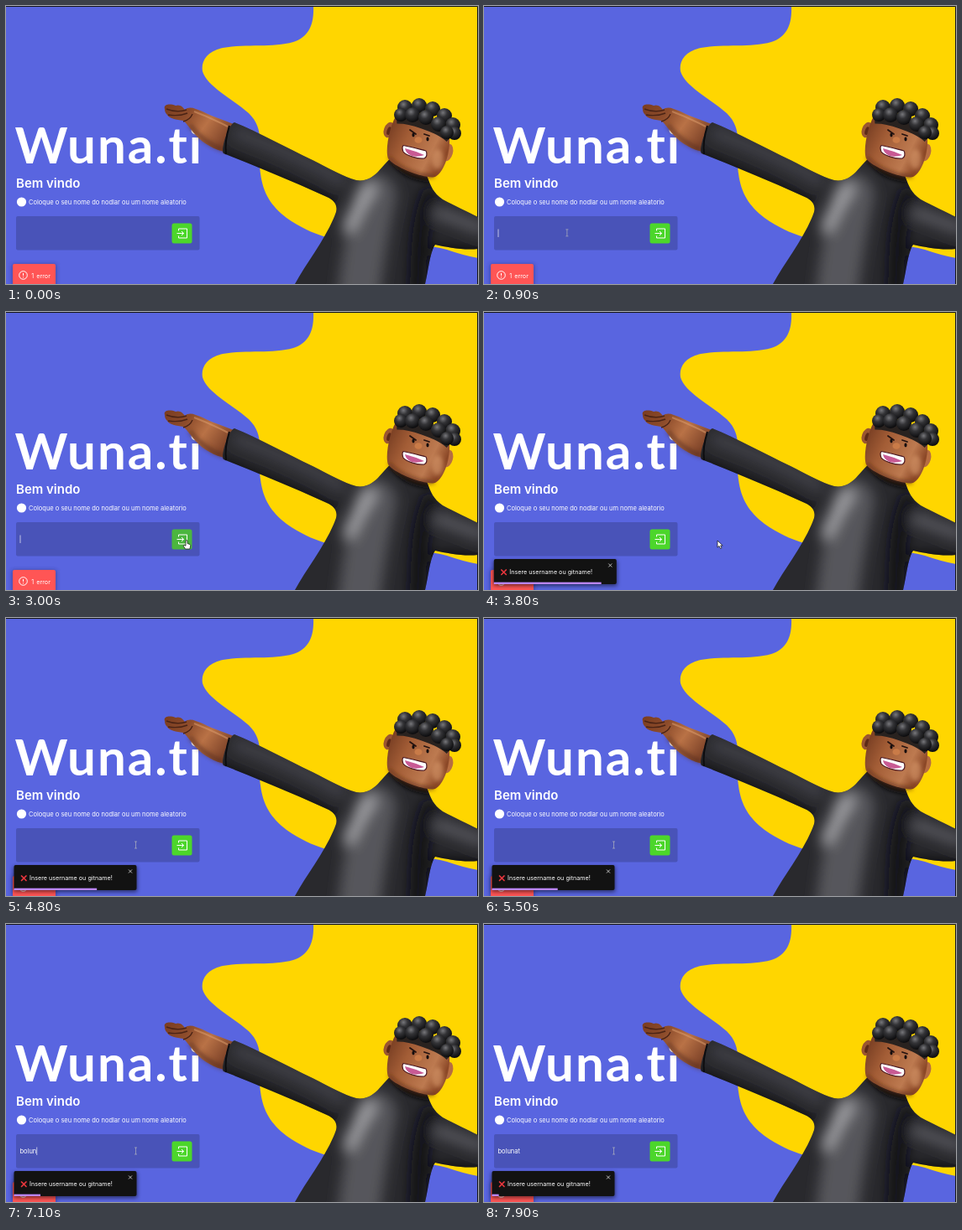
Write an HTML page that moves like this. It is 562 px wide and 332 px high and loops after 8 s.

```html
<!DOCTYPE html>
<html lang="pt">
<head>
<meta charset="utf-8">
<title>Bem vindo</title>
<style>
  html, body { margin: 0; width: 100%; height: 100%; overflow: hidden; background: #5965e0; }
  svg { display: block; width: 562px; height: 332px; }
  text { font-family: Inter, sans-serif; fill: #fff; }
</style>
</head>
<body>
<svg viewBox="0 0 562 332">
  <defs>
    <linearGradient id="palm" x1="0" y1="0" x2="1" y2=".5">
      <stop offset="0" stop-color="#7a3c20"/><stop offset=".35" stop-color="#8d4c2b"/><stop offset=".65" stop-color="#b97246"/><stop offset="1" stop-color="#80452a"/>
    </linearGradient>
    <linearGradient id="face" x1="0" y1="0" x2="1" y2=".5">
      <stop offset="0" stop-color="#6b351d"/><stop offset=".4" stop-color="#a35d36"/><stop offset=".8" stop-color="#bd7a50"/><stop offset="1" stop-color="#8b4827"/>
    </linearGradient>
    <radialGradient id="curl" cx=".4" cy=".3" r=".7">
      <stop offset="0" stop-color="#77777b"/><stop offset=".4" stop-color="#343437"/><stop offset="1" stop-color="#0b0b0d"/>
    </radialGradient>
    <filter id="soft" x="-50%" y="-50%" width="200%" height="200%"><feGaussianBlur stdDeviation="8"/></filter>
    <filter id="fine" x="-50%" y="-50%" width="200%" height="200%"><feGaussianBlur stdDeviation="2.5"/></filter>
    <path id="suit" d="M272 139C300 150 335 170 365 184C385 194 402 204 417 208C429 210 437 204 443 198C450 190 456 183 461 179L501 203C505 211 507 223 520 231C535 239 550 246 562 252V290C545 292 525 288 511 285C505 293 503 315 499 332H344C358 306 383 275 393 246C395 238 391 232 382 228C340 209 300 192 259 176C255 172 265 141 272 139Z"/>
    <clipPath id="inSuit"><use href="#suit"/></clipPath>
  </defs>

  <rect width="562" height="332" fill="#5965e0"/>
  <path fill="#ffd600" d="M366 0C367 23 360 37 342 43C318 50 287 45 258 50C239 54 232 66 234 78C239 96 270 111 289 128C300 139 303 150 302 168C301 184 302 192 303 200C306 224 316 239 334 253C348 263 364 271 381 276C430 287 490 281 525 291Q545 298 562 301V0Z"/>
  <path d="M0 .5H561.500V332" fill="none" stroke="#17171c"/>

  <text x="10.500" y="188" font-size="60" font-weight="700" letter-spacing="2" style="font-family:Lato,sans-serif">Wuna.ti</text>
  <text x="12" y="217" font-size="15" font-weight="600">Bem vindo</text>
  <circle cx="18.500" cy="234" r="5.600" fill="#fff"/>
  <text x="27" y="236.600" font-size="7.5">Coloque o seu nome do nodlar ou um nome aleatorio</text>

  <rect x="12" y="251" width="218.500" height="40.500" rx="2" fill="#4953b8"/>
  <text id="typed" x="16.500" y="274" font-size="7.5"></text>
  <rect id="caret" y="266.500" width=".8" height="9.500" fill="#fff" opacity=".8"/>
  <rect id="button" x="197.500" y="259.500" width="24" height="24" rx="2.500"/>
  <path d="M205.500 268.500V266H215.500V277H205.500V274.500M203.500 271.500H211.500M209 269L211.500 271.500L209 274" fill="none" stroke="#fff"/>

  <!-- hand -->
  <path fill="url(#palm)" d="M189 123C187 118 194 116 202 119C207 117 211 121 213 124C216 121 221 121 226 123C236 126 243 131 250 133L271 141L260 174C246 171 232 162 224 152C219 146 215 140 211 137C203 136 194 134 192 130C190 128 189 126 189 123Z"/>
  <path d="M191 123Q204 128 215 124M193 130Q206 132 216 128M211 138Q219 136 222 129" fill="none" stroke="#4a2315" stroke-width="1.400"/>
  <path d="M224 126Q243 133 264 144" fill="none" stroke="#e0a06e" stroke-width="2" opacity=".5"/>
  <path d="M219 142Q235 164 262 173" fill="none" stroke="#54291a" stroke-width="5" opacity=".6" filter="url(#fine)"/>

  <!-- body -->
  <ellipse cx="456" cy="148" rx="6" ry="9.500" fill="#9a5631" transform="rotate(20 456 148)"/>
  <ellipse cx="456.500" cy="149" rx="2.500" ry="5" fill="#5d2a17" transform="rotate(20 456 148)"/>
  <ellipse cx="526" cy="175" rx="6" ry="10.500" fill="#b66d42" transform="rotate(15 526 175)"/>
  <use href="#suit" fill="#29292d"/>
  <g clip-path="url(#inSuit)">
    <g filter="url(#soft)" fill="none" stroke-linecap="round">
      <path d="M440 225C432 260 425 300 420 345" stroke="#56565b" stroke-width="50"/>
      <path d="M275 151C315 166 360 186 400 208" stroke="#4b4c53" stroke-width="10"/>
      <path d="M255 182C310 204 350 221 388 238" stroke="#08080a" stroke-width="12"/>
      <path d="M434 218C424 232 416 246 408 264" stroke="#a2a2a6" stroke-width="14"/>
      <path d="M505 225C490 262 492 300 490 340" stroke="#111114" stroke-width="18"/>
      <path d="M515 247C533 253 550 260 566 265" stroke="#5b5c62" stroke-width="13"/>
      <path d="M510 294C530 294 550 297 570 297" stroke="#08080a" stroke-width="12"/>
    </g>
    <path d="M459 180Q474 204 505 206" stroke="#09090b" stroke-width="9" fill="none" filter="url(#fine)"/>
  </g>
  <path d="M266 143Q260 162 262 177" fill="none" stroke="#0c0c0f" stroke-width="2"/>

  <!-- head -->
  <path fill="url(#face)" d="M464 132C476 128 524 144 528 157C529 175 522 198 511 204C500 207 462 193 455 182C451 172 457 143 464 132Z"/>
  <path d="M456 181C469 195 494 205 510 203" fill="none" stroke="#612e19" stroke-width="3" filter="url(#fine)"/>
  <ellipse cx="514" cy="183" rx="7" ry="12" fill="#d99a6c" opacity=".6" filter="url(#fine)"/>
  <path d="M481 148L488 153M498 153L504 155" stroke="#251310" stroke-width="1.800" stroke-linecap="round"/>
  <ellipse cx="485" cy="154" rx="1.600" ry="2.400" fill="#160e0e"/>
  <ellipse cx="502" cy="159" rx="1.600" ry="2.400" fill="#160e0e"/>
  <ellipse cx="491" cy="160" rx="4.500" ry="3.800" fill="#c97b48"/>
  <path d="M473 166.500C482 168 492 171 500 173C502 176 501 181 498 182C489 183 476 178 473 174Q471 169 473 166.500Z" fill="#fff" stroke="#4b1720" stroke-width="1.200"/>
  <path d="M475 170Q487 173 498 178Q490 181 483 179Q476 176 475 170Z" fill="#c85a94"/>
  <path d="M465 134C480 133 514 144 529 157" fill="none" stroke="#29221f" stroke-width="13"/>
  <g id="hair" fill="url(#curl)"></g>

  <!-- error badge -->
  <rect x="7" y="308" width="53" height="28" rx="2" fill="#22235a" opacity=".45" filter="url(#fine)"/>
  <rect x="8" y="308" width="51" height="28" rx="2" fill="#ff5555"/>
  <circle cx="20.500" cy="321.500" r="4.800" fill="none" stroke="#fff"/>
  <path d="M20.500 319V322M20.500 323.300V324.300" stroke="#fff"/>
  <text x="30.300" y="324.600" font-size="7.2" word-spacing="1">1 error</text>

  <g id="toast">
    <rect x="9" y="297" width="147" height="30" fill="#000" opacity=".55" filter="url(#fine)"/>
    <rect x="9.500" y="295" width="146" height="30" rx="2" fill="#121212"/>
    <path d="M18.500 308L24 313.500M24 308L18.500 313.500" stroke="#e8363d" stroke-width="1.700" stroke-linecap="round"/>
    <text x="28" y="313.300" font-size="7.2">Insere username ou gitname!</text>
    <path d="M146 300.500L150 304.500M150 300.500L146 304.500" stroke="#ccc" stroke-width=".9"/>
    <rect id="bar" x="9.500" y="322.700" height="2.300" fill="#bb86fc"/>
  </g>

  <g id="arrow"><path d="M0 0V8.200L2 6.400L3.500 9.500L5 8.800L3.600 5.900H6.200Z" fill="#fff" stroke="#111" stroke-width=".7"/></g>
  <g id="beam"><path d="M-1.500 -4H1.500M0 -4V4M-1.500 4H1.500" fill="none" stroke="#a5a8bd" stroke-width=".8"/></g>
  <g id="hand"><path d="M-1 -5Q0 -6 1 -5V-1.500L4 -.5Q5 0 4.600 2L3.800 5H-1.500L-4 1Q-3.500 -.6 -1 1.200Z" fill="#fff" stroke="#111" stroke-width=".7"/></g>
</svg>
<script>
const $ = id => document.getElementById(id);
const show = (id, on) => $(id).style.display = on ? '' : 'none';
const LOOP = 8000, NAME = 'bolunat';
const CLICK = 3180, TYPE = 6600, KEY = 115;

// x, y, radius of each curl
$('hair').innerHTML = [
  [475, 121, 9], [492, 119, 9], [508, 123, 9], [522, 131, 9], [532, 142, 9],
  [470, 130, 8], [534, 152, 8], [484, 130, 9], [500, 133, 9], [515, 141, 9], [525, 151, 8]
].map(([x, y, r]) => `<circle cx="${x}" cy="${y}" r="${r}"/>`).join('');

const inOut = u => u * u * (3 - 2 * u);
const out = u => 1 - (1 - u) ** 3;

// Interpolates keys of the form [time, ...values]
function track(keys, t, ease) {
  if (t <= keys[0][0]) return keys[0].slice(1);
  const i = keys.findIndex(k => k[0] > t);
  if (i < 0) return keys[keys.length - 1].slice(1);
  const a = keys[i - 1], b = keys[i], u = ease((t - a[0]) / (b[0] - a[0]));
  return a.slice(1).map((v, n) => v + (b[n + 1] - v) * u);
}

const pointer = [
  [100, 140, 334], [550, 100, 272], [1200, 98, 270], [1700, 84, 245], [1900, 84, 245],
  [2650, 215, 278], [3200, 215, 278], [3750, 278, 273], [4000, 278, 273], [4500, 154.500, 271]
];
const bounce = [[0, -1368], [.6, 11.4], [.75, -4.6], [.9, 2.3], [1, 0]];
const inside = (x, y, l, t, r, b) => x >= l && x <= r && y >= t && y <= b;

function draw(t) {
  const [x, y] = track(pointer, t, inOut);
  const over = inside(x, y, 198, 260, 221, 283);
  const field = !over && inside(x, y, 12, 251, 230, 291);
  const kind = t < 100 ? '' : over ? 'hand' : field ? 'beam' : 'arrow';
  for (const id of ['arrow', 'beam', 'hand']) {
    show(id, id === kind);
    $(id).setAttribute('transform', `translate(${x} ${y})`);
  }
  $('button').setAttribute('fill', over ? '#4bb63f' : '#4cd62b');

  const count = Math.max(0, Math.min(NAME.length, Math.floor((t - TYPE) / KEY) + 1));
  $('typed').textContent = NAME.slice(0, count);
  const focus = t < 3100 ? 600 : count ? TYPE + (count - 1) * KEY : 6000;
  const active = t < 3100 || t >= 6000;
  show('caret', active && t >= focus && (t - focus) % 1000 < 500);
  $('caret').setAttribute('x', 16.6 + (count ? $('typed').getComputedTextLength() : 0));

  const age = t - CLICK;
  show('toast', age >= 0);
  $('toast').setAttribute('transform', `translate(${track(bounce, age / 700, out)[0]} 0)`);
  $('bar').setAttribute('width', 146 * Math.max(0, Math.min(1, 1 - age / 5000)));
}

const start = performance.now();
function frame() {
  draw((performance.now() - start) % LOOP);
  requestAnimationFrame(frame);
}
frame();
</script>
</body>
</html>
```
